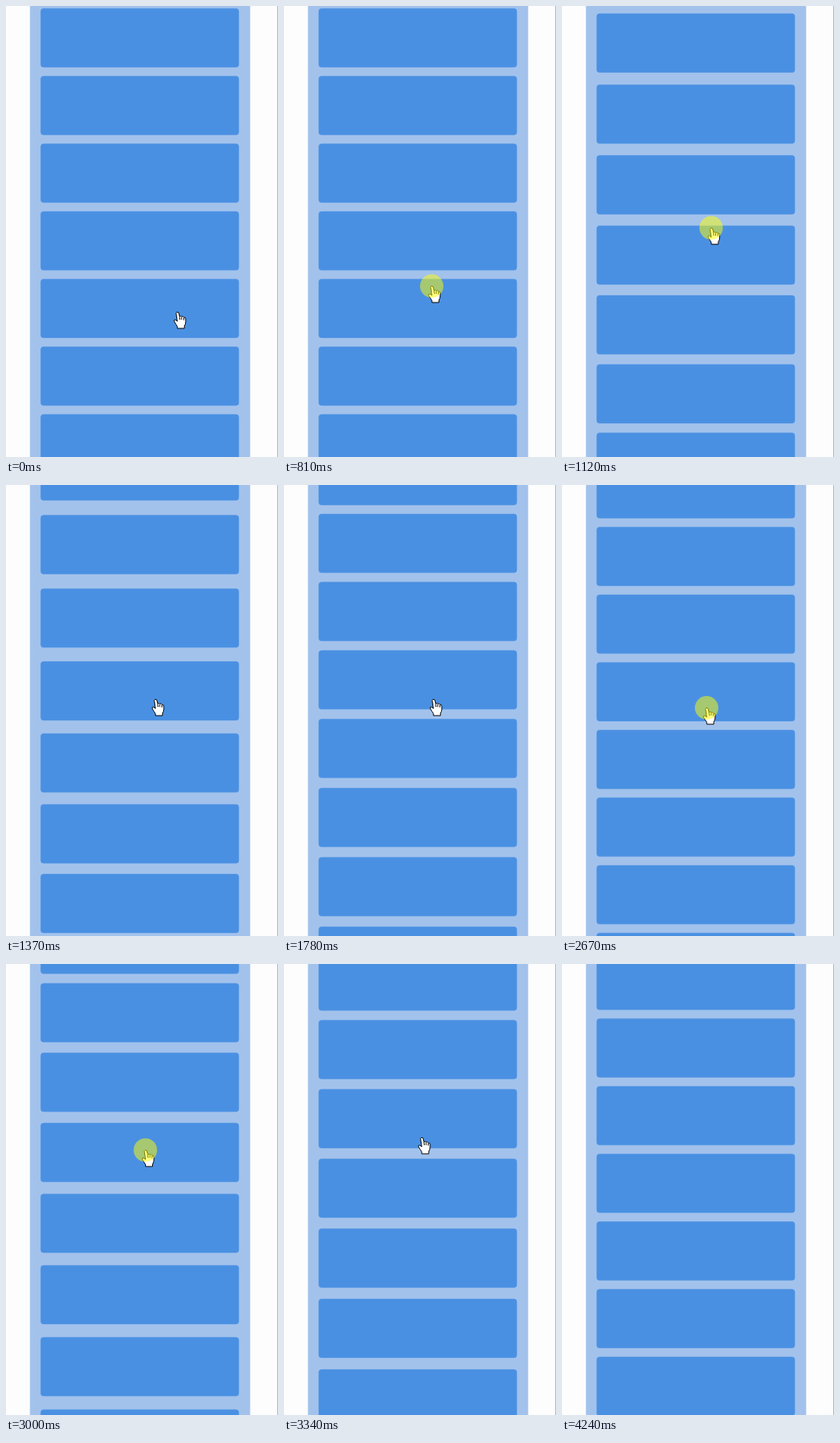
Write an HTML page with a canvas that moves like this. It is 348 by 575 pixels and loops after 4530 ms.

```html
<!DOCTYPE html>
<html lang="en">
<head>
<meta charset="utf-8">
<title>Springy list</title>
<style>
  html, body { margin: 0; width: 100%; height: 100%; overflow: hidden; background: #fdfdfd; }
  canvas { display: block; }
</style>
</head>
<body>
<canvas id="stage" width="348" height="575"></canvas>
<script>
const W = 348, H = 575, LOOP = 4530;
const PITCH = 86.25, CARD_H = 75.25, FIRST = 3;
const ctx = document.getElementById('stage').getContext('2d');

// 0 before a, 1 after b, eased between.
function ease(t, a, b) {
  const u = Math.max(0, Math.min(1, (t - a) / (b - a)));
  return u * u * (3 - 2 * u);
}
const bump = (t, a, peak, b) => ease(t, a, peak) * (1 - ease(t, peak, b));

// Three drags push the list up.
function scroll(t) {
  return 138 * ease(t, 820, 1370)
    + 70.25 * ease(t, 2030, 2650)
    + 70.25 * ease(t, 2690, 3380);
}

// Lower cards trail behind the scroll and catch up; u is the height on the stage.
function lag(t, y) {
  const u = Math.max(0, Math.min(1, (y + 50) / (7 * PITCH)));
  return 35 * bump(t, 820, 1370, 1780) * (Math.sin(u * Math.PI / 2) - 0.2)
    + 9 * bump(t, 1370, 1780, 2040) * (u * u - 0.1)
    + 10 * bump(t, 2050, 2300, 2640) * u ** 1.6
    + 36 * bump(t, 2690, 3140, 3540) * u ** 1.6;
}

const moves = [
  { from: 20, to: 520, x: 188, y: 369 },
  { from: 570, to: 780, x: 190, y: 357 },
  { from: 830, to: 1200, x: 192, y: 273 },
  { from: 1800, to: 2040, x: 187, y: 354 },
  { from: 2060, to: 2640, x: 186, y: 284 },
  { from: 2700, to: 3150, x: 177, y: 221 },
  { from: 3380, to: 3840, x: 267, y: 402 },
  { from: 3840, to: 4240, x: 321, y: 578 }
];

function cursorAt(t) {
  let x = 220, y = 390;
  for (const m of moves) {
    const k = ease(t, m.from, m.to);
    x += (m.x - x) * k;
    y += (m.y - y) * k;
  }
  return [x, y];
}

const pressed = t => (t >= 790 && t < 1200) || (t >= 2050 && t < 3150);

function drawPanel() {
  ctx.fillStyle = '#fdfdfd';
  ctx.fillRect(0, 0, W, H);
  ctx.fillStyle = 'rgba(162, 194, 236, 0.4)';
  ctx.fillRect(30, 0, 283, H);
  ctx.fillStyle = '#a2c2ec';
  ctx.fillRect(31, 0, 281, H);
  ctx.fillStyle = '#b4b4b4';
  ctx.fillRect(347, 0, 1, H);
}

function drawCards(t) {
  const up = scroll(t);
  ctx.fillStyle = '#4a90e2';
  ctx.strokeStyle = 'rgba(74, 144, 226, 0.45)';
  ctx.lineWidth = 1;
  for (let i = 0; i < 12; i++) {
    const base = FIRST + PITCH * i - up;
    const y = base + lag(t, base);
    if (y > H || y + CARD_H < 0) continue;
    ctx.beginPath();
    ctx.roundRect(44.5, y + 0.2, 253.3, CARD_H - 0.4, 3.5);
    ctx.fill();
    ctx.stroke();
  }
}

const hand = new Path2D(
  'M-2.3 1.5 Q-1.6 -0.8 0.8 0.8 L2 5.5 Q3.6 4.6 4.8 6 Q6.4 5.2 7.5 7 Q9.8 6.6 9.9 9 ' +
  'V13 Q9.7 16 8.2 18 V21 H-0.8 V18.5 Q-2.8 15.5 -4.8 12.2 Q-5.6 9.8 -3.2 10 L-0.8 12 Z');
const knuckles = new Path2D('M2 5.5 L2.5 10 M4.8 6.5 V10 M7.5 7.5 V10.5');

function drawCursor(t) {
  if (t >= 4240) return;
  const [x, y] = cursorAt(t);
  ctx.save();
  ctx.translate(x, y);
  ctx.lineWidth = 1;
  ctx.lineJoin = 'round';
  ctx.strokeStyle = '#000';
  ctx.fillStyle = '#fff';
  ctx.fill(hand);
  ctx.stroke(hand);
  ctx.stroke(knuckles);
  if (pressed(t)) {
    ctx.fillStyle = 'rgba(255, 255, 0, 0.5)';
    ctx.beginPath();
    ctx.arc(-1, 0, 15, 0, Math.PI * 2);
    ctx.fill();
  }
  ctx.restore();
}

const start = performance.now();
function tick() {
  const t = (performance.now() - start) % LOOP;
  drawPanel();
  drawCards(t);
  drawCursor(t);
  requestAnimationFrame(tick);
}
tick();
</script>
</body>
</html>
```
